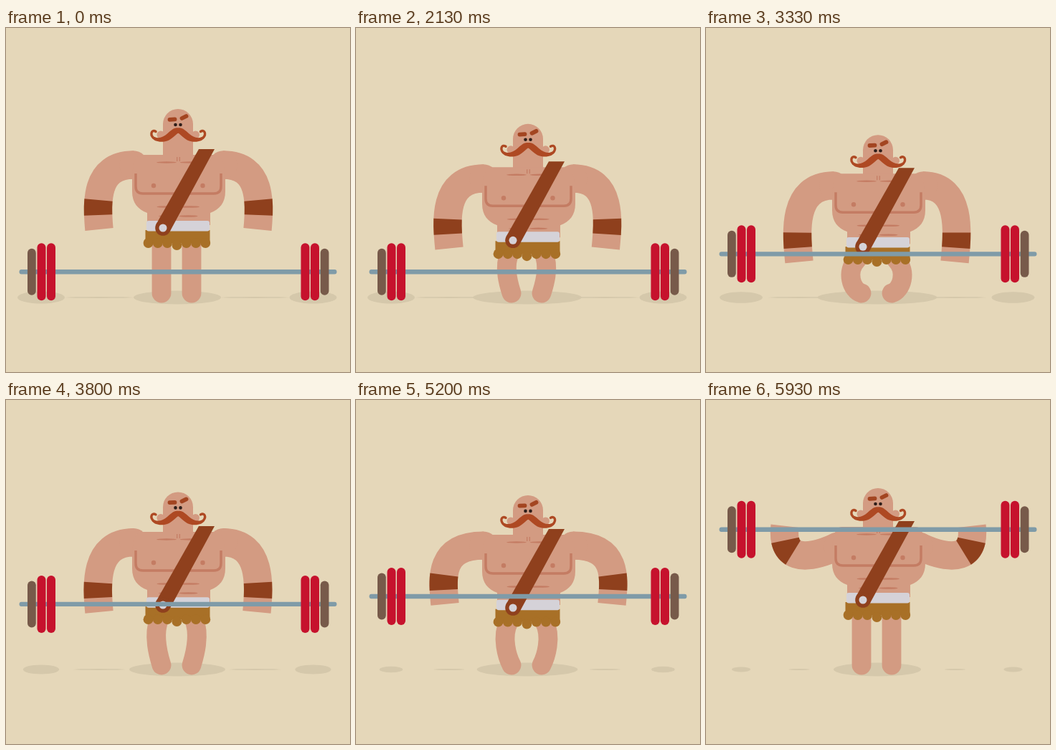
Animation, 480 px wide and 480 px high, one loop 5990 ms. Source, as an HTML page:

```html
<!DOCTYPE html>
<html lang="en">
<head>
<meta charset="utf-8">
<title>Weightlifter</title>
<style>
  html, body { margin: 0; width: 100%; height: 100%; overflow: hidden; background: #e5d7b9; }
  svg { display: block; width: 100vw; height: 100vh; }
  .skin { fill: #d39b82; }
  .limb { fill: none; stroke: #d39b82; }
  .arm { stroke-width: 39.4; }
  .leg { fill: #d39b82; stroke-width: 26.8; stroke-linecap: round; }
  .band { stroke: #8f401d; stroke-dasharray: 21 999; stroke-dashoffset: -20; }
  .leather { fill: #8f401d; }
  .crease { fill: #c47c63; }
  .line { fill: none; stroke: #c47c63; }
  .hair { fill: #ae4923; }
  .curl { fill: none; stroke: #ae4923; stroke-width: 3.4; stroke-linecap: round; }
  .brow { stroke: #a34521; stroke-width: 5.8; stroke-linecap: round; }
  .cloth { fill: #a87027; }
  .white { fill: #d5d2d8; }
  .shadow { fill: #d5c8ab; }
  .red { fill: #c6122d; }
  .grey { fill: #775a4a; }
  .steel { fill: #7f9ba8; }
</style>
</head>
<body>
<svg viewBox="0 0 480 480">
  <defs>
    <g id="whisker">
      <path class="hair" d="M240.500 139.500C235 138 230 143 225 147.500C220 152 213 155 207.500 152L203 152C206 159 217 160 225 157.500C232 155 236 149 240.500 146.500Z"/>
      <path class="curl" d="M205.500 153C200.500 148 203.500 141 209 144.500"/>
    </g>
    <g id="plates">
      <rect class="grey" x="30" y="-32.500" width="11.800" height="65" rx="5.900"/>
      <rect class="red" x="43.500" y="-40" width="12" height="80" rx="6"/>
      <rect class="red" x="57" y="-40" width="12" height="80" rx="6"/>
    </g>
    <g id="creases" class="crease">
      <circle cx="206" cy="220" r="3.200"/>
      <ellipse cx="224" cy="187.500" rx="14" ry="1.200"/>
      <ellipse cx="225" cy="249.500" rx="14.500" ry="1.300"/>
      <ellipse cx="226" cy="262.500" rx="13" ry="1.300"/>
    </g>
  </defs>

  <g class="shadow">
    <ellipse id="bodyShade" cx="239" cy="376" ry="9.500"/>
    <ellipse class="plateShade" cx="49" cy="376"/>
    <ellipse class="plateShade" cx="428.500" cy="376"/>
    <ellipse class="barShade" cx="130" cy="376" ry="0.900"/>
    <ellipse class="barShade" cx="347.500" cy="376" ry="0.900"/>
  </g>

  <path class="limb leg"/>
  <path class="limb leg" transform="translate(476) scale(-1 1)"/>

  <g class="side">
    <path class="limb arm"/><circle class="skin" r="19.700"/><path class="limb arm band"/>
  </g>
  <g class="side" transform="translate(481) scale(-1 1)">
    <path class="limb arm"/><circle class="skin" r="19.700"/><path class="limb arm band"/>
  </g>

  <g id="head">
    <circle class="skin" cx="216" cy="149" r="5.500"/><circle class="skin" cx="264.500" cy="149" r="5.500"/>
    <path class="skin" d="M219 180V134A21 21 0 0 1 261 134V180Z"/>
    <path class="brow" d="M228.500 127.800L235.500 127.400M245.500 126L251.500 123"/>
    <circle cx="236.500" cy="135" r="2.300" fill="#2e1e1a"/><circle cx="243.500" cy="135" r="2.300" fill="#2e1e1a"/>
    <use href="#whisker"/>
    <use href="#whisker" transform="translate(480.500) scale(-1 1)"/>
  </g>

  <g class="chest">
    <path class="skin" d="M190 177H292C302 177 305 190 306 209V228C306 244 298 253 285 258V275H197V258C184 253 176 244 176 228V209C177 190 180 177 190 177Z"/>
    <path class="line" stroke-width="3.400" d="M181 203V221Q181 231 191 231H290Q300 231 300 221V203"/>
    <path class="line" stroke-width="1.200" d="M238.700 180V186M242.300 180V186"/>
    <use href="#creases"/>
    <use href="#creases" transform="translate(480.500) scale(-1 1)"/>
  </g>

  <g id="hips">
    <g id="skirt" class="cloth"><rect x="194.500" y="282" width="90" height="18"/></g>
    <rect class="white" x="196" y="269" width="88" height="14.500" rx="3"/>
  </g>

  <g class="chest">
    <path class="leather" d="M269 169H291L228.600 284L209.400 274Z"/>
    <circle class="leather" cx="219" cy="279" r="10.800"/>
    <circle class="white" cx="219" cy="279" r="5.500"/>
  </g>

  <g id="barbell">
    <rect class="steel" x="18.500" y="-3.200" width="443" height="6.400" rx="3"/>
    <use href="#plates"/>
    <use href="#plates" transform="translate(480.500) scale(-1 1)"/>
  </g>
</svg>

<script>
const LOOP = 5990, FLOOR = 340.3, FOOT = 370;
const $ = id => document.getElementById(id);
const all = sel => [...document.querySelectorAll(sel)];
const set = (els, name, value) => els.forEach(el => el.setAttribute(name, value));
const move = (els, y) => set(els, "transform", `translate(0 ${y})`);

const part = (t, a, b) => Math.min(1, Math.max(0, (t - a) / (b - a)));
const ease = (t, a, b) => { const x = part(t, a, b); return x * x * (3 - 2 * x); };
const easeOut = (t, a, b, power) => 1 - (1 - part(t, a, b)) ** power;

const legs = all(".leg"), sides = all(".side"), chest = all(".chest");
const plateShades = all(".plateShade"), barShades = all(".barShade");

for (let i = 0; i < 7; i++) {
  $("skirt").insertAdjacentHTML("beforeend",
    `<circle cx="${198.5 + 13.3 * i}" cy="${i === 3 ? 303 : 300}" r="6.900"/>`);
}

// Squat, slow pull to standing, dip, then the quick clean to the shoulders.
function pose(t) {
  const lift = power => easeOut(t, 3060, 4650, power);
  const squat = ease(t, 1860, 2510) - lift(3);
  const dip = ease(t, 4860, 5250) - ease(t, 5300, 5620);
  const strain = 7 * (ease(t, 3060, 3500) - ease(t, 3800, 4350) + dip);
  const flip = ease(t, 5400, 5850);
  const chest = 46 * squat + 11.5 * dip;
  const bar = FLOOR - 74 * lift(2.2) + 8 * dip - 85.5 * ease(t, 5330, 5840);
  const left = 130 - 6 * ease(t, 4860, 5200) - 14 * flip;
  const rise = lift(1.3), late = ease(t, 4600, 5900);
  return {
    chest, bar, flip, left,
    right: left + 7 * squat,
    hand: t < 3060 ? 281 + 1.53 * chest : bar + 11 - 16 * flip,
    head: 1.2 * chest + strain + 10 * ease(t, 5600, 5900),
    shoulder: 1.1 * chest + 13 * flip,
    hip: 0.88 * chest,
    bow: 0.6 * chest + strain,
    bodyShade: 61 + 0.85 * chest,
    plateShade: 33 - 14 * rise - 6 * late,
    barShade: 48 - 21 * rise - 12.5 * late
  };
}

// Drawn from hand to shoulder so the band keeps its distance from the hand.
function drawArm(side, x, { flip, shoulder, hand }) {
  const sx = 178 + 6 * flip, sy = 191 + shoulder;
  const angle = (-95.5 - 168 * flip) * Math.PI / 180, reach = 37 + 8 * flip;
  const wx = x + reach * Math.cos(angle), wy = hand + reach * Math.sin(angle);
  const ex = x - 6 - 0.2 * shoulder * (1 - flip) + 31 * flip, ey = sy + 23 * flip;
  const [arm, joint, band] = side.children;
  set([arm, band], "d", `M${x} ${hand}C${wx} ${wy} ${ex} ${ey} ${sx} ${sy}`);
  set([joint], "cx", sx);
  set([joint], "cy", sy);
}

function drawLegs({ hip, bow }) {
  const top = 300 + hip, len = FOOT - top, x = 217;
  set(legs, "d", `M${x - bow * 0.3} ${top}C${x - bow * 1.1} ${top + len * 0.35}
    ${x - bow * bow / 30} ${FOOT - len * 0.3 + bow * 0.5} ${x} ${FOOT}`);
}

function draw(t) {
  const p = pose(t);
  move([$("head")], p.head);
  move(chest, p.chest);
  move([$("hips")], p.hip);
  move([$("barbell")], p.bar);
  drawLegs(p);
  drawArm(sides[0], p.left, p);
  drawArm(sides[1], p.right, p);
  set([$("bodyShade")], "rx", p.bodyShade);
  set(plateShades, "rx", p.plateShade);
  set(plateShades, "ry", p.plateShade * 0.26);
  set(barShades, "rx", p.barShade);
}

const start = performance.now();
function tick() {
  draw((performance.now() - start) % LOOP);
  requestAnimationFrame(tick);
}
tick();
</script>
</body>
</html>
```
